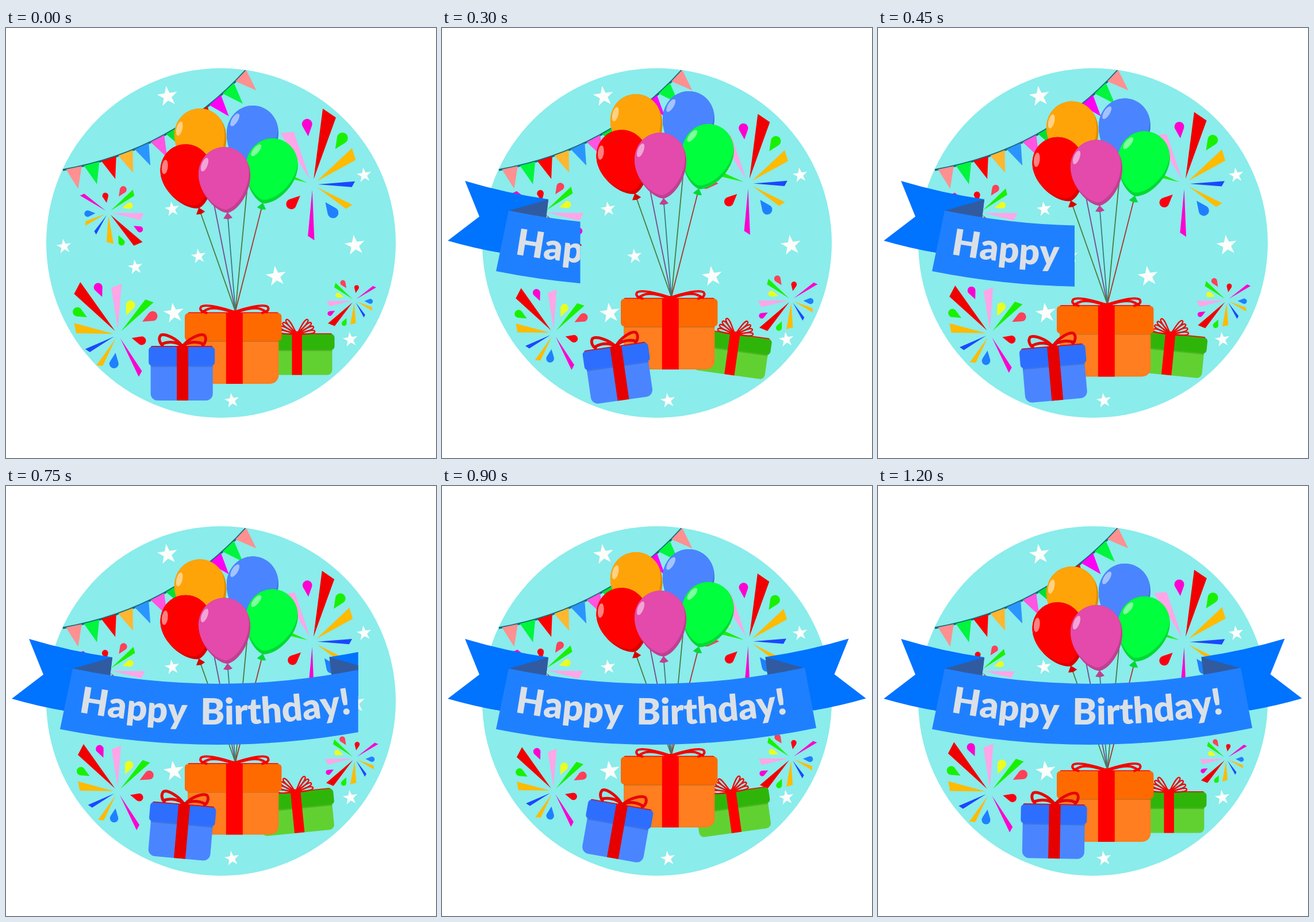
Animation of 748x748 px, one loop 1.35 s. Source, as an HTML page with a canvas:

```html
<!DOCTYPE html>
<html lang="en">
<head>
<meta charset="utf-8">
<title>Happy Birthday</title>
<style>
html, body { margin: 0; width: 100%; height: 100%; overflow: hidden; background: #fff; }
canvas { display: block; width: 748px; height: 748px; }
</style>
</head>
<body>
<canvas id="stage" width="748" height="748"></canvas>
<script>
const ctx = document.getElementById('stage').getContext('2d');
const STEP = 150, STEPS = 9;
const rad = deg => deg * Math.PI / 180;

// Straight moves between [step, value] keys
function track(n, ...keys) {
  for (let i = 1; i < keys.length; i++) {
    const [a, from] = keys[i - 1], [b, to] = keys[i];
    if (n <= b) return from + (to - from) * (n - a) / (b - a);
  }
  return keys[keys.length - 1][1];
}

const wave = n => (1 - Math.cos(n * Math.PI / 2)) / 2;
const lift = n => 25 * wave(n);
const sway = n => rad(8 * Math.sin(n * Math.PI / 4));
const rock = n => rad(track(n, [0, 0], [2.2, -9], [6, 10], [8, 1]));
const wipe = n => n && track(n, [1, 139], [3, 342], [6, 748]);

function poly(color, ...p) {
  ctx.fillStyle = color;
  ctx.beginPath();
  for (let i = 0; i < p.length; i += 2) ctx.lineTo(p[i], p[i + 1]);
  ctx.fill();
}

function ellipse(color, x, y, rx, ry = rx, turn = 0) {
  ctx.fillStyle = color;
  ctx.beginPath();
  ctx.ellipse(x, y, rx, ry, turn, 0, 7);
  ctx.fill();
}

function box(color, x, y, w, h, r = 0) {
  ctx.fillStyle = color;
  ctx.beginPath();
  ctx.roundRect(x, y, w, h, r);
  ctx.fill();
}

function stroke(color, width, d) {
  ctx.strokeStyle = color;
  ctx.lineWidth = width;
  ctx.stroke(new Path2D(d));
}

function fill(color, d) {
  ctx.fillStyle = color;
  ctx.fill(new Path2D(d));
}

function at(x, y, turn, draw) {
  ctx.save();
  ctx.translate(x, y);
  ctx.rotate(turn);
  draw();
  ctx.restore();
}

function mirrored(draw) {
  for (const side of [1, -1]) {
    ctx.save();
    ctx.scale(side, 1);
    draw();
    ctx.restore();
  }
}

const bigStars = [[281, 119], [470, 432], [292, 496], [607, 378]];
const smallStars = [[289, 315], [101, 380], [225, 416], [335, 397], [623, 256], [599, 542], [393, 648]];

function star(x, y, r) {
  const p = [];
  for (let i = 0; i < 10; i++) {
    const a = rad(i * 36 - 98), q = i % 2 ? r * .39 : r;
    p.push(x + q * Math.cos(a), y + q * Math.sin(a));
  }
  poly('#fdfdfb', ...p);
}

const flagColors = ['#ff9090', '#00f53d', '#ff0000', '#ffb730', '#2b95ff', '#ff55e0',
  '#00e030', '#2b95ff', '#ff0000', '#ff00f5', '#00f53d', '#ff9090'];

// Point on the bunting cord
const cord = t => [99 + 382 * t - 64 * t * t, 247 - 67 * t - 106 * t * t];

function bunting() {
  stroke('#176a7a', 3.5, 'M99 247Q290 213.5 417 74');
  flagColors.forEach((color, i) => {
    const t = .014 + i / 12;
    const [x, y] = cord(t), [u, v] = cord(t + .073);
    const k = 37 / Math.hypot(u - x, v - y);
    poly(color, x, y, u, v, (x + u) / 2 - (v - y) * k, (y + v) / 2 + (u - x) * k);
  });
}

// colour, angles of the two outer corners, length
const rays = [
  ['#f00000', 222.6, 234.2, 104], ['#ffa6e8', 261.6, 274, 82], ['#19f000', 308, 318, 77],
  ['#ff00d0', 57, 64, 76], ['#ffbb00', 116, 125, 61], ['#1a48ff', 148, 156, 58],
  ['#ffbb00', 181.5, 194.5, 73]
];

// colour, angle, distance, radius
const drops = [
  ['#ff00d0', 247, 89, 7.5], ['#eaff1f', 293, 55.5, 8], ['#ff4058', 332, 68, 8.5],
  ['#fb0010', 15, 42.5, 7.5], ['#1f80ff', 98, 51.5, 8], ['#19f000', 209, 81, 8]
];

function ray([color, from, to, len]) {
  const a = rad(from), b = rad(to), c = (a + b) / 2, far = len * 1.08;
  poly(color, 8 * Math.cos(c), 8 * Math.sin(c),
    len * Math.cos(a), len * Math.sin(a), far * Math.cos(b), far * Math.sin(b));
}

function drop([color, angle, dist, r]) {
  at(0, 0, rad(angle), () => {
    ctx.fillStyle = color;
    ctx.beginPath();
    ctx.arc(dist, 0, r, Math.PI + 1.1, Math.PI - 1.1);
    ctx.lineTo(dist - 2.4 * r, 0);
    ctx.fill();
  });
}

function burst(x, y, size, turn, flip, pulse) {
  at(x, y, rad(turn), () => {
    ctx.scale(flip * size, size);
    ctx.translate(-5, -14);
    ctx.scale(pulse, pulse);
    ctx.translate(5, 14);
    rays.forEach(ray);
    drops.forEach(drop);
  });
}

function fireworks(n) {
  const pulse = gain => 1 + gain * wave(n) - .006 * n;
  burst(533, 272, 1.185, -28, -1, pulse(-.07));
  burst(178, 321, .7, 95, -1, pulse(.13));
  burst(195, 533, 1, 0, 1, pulse(-.125));
  burst(606, 474, .54, -95, 1, pulse(.22));
}

// x, y, tilt, colour, string colour
const balloons = [
  [338, 188, -.2, '#ffa408', '#7a4a8c'],
  [429, 183, .1, '#4a85ff', '#4a7a40'],
  [314, 250, -.33, '#ff0000', '#4c7a3a'],
  [462.5, 240, .24, '#00ff3c', '#a8342c'],
  [380, 255, -.08, '#e34aab', '#3f7a80']
];
const skin = new Path2D('M0 67C-20 64-45 32-45 0C-45-27-25-48 0-48C25-48 45-27 45 0C45 32 20 64 0 67Z');
const shade = 'rgba(0,0,0,.15)';

function string([x, y, tilt, , color]) {
  ctx.strokeStyle = color;
  ctx.lineWidth = 1.8;
  ctx.beginPath();
  ctx.moveTo(x - 74 * Math.sin(tilt), y + 74 * Math.cos(tilt));
  ctx.lineTo(399, 493);
  ctx.stroke();
}

function balloon([x, y, tilt, color]) {
  at(x, y, tilt, () => {
    for (const tone of [color, shade]) {
      poly(tone, 0, 66, 8, 76, 0, 78, -8, 76);
      ctx.fillStyle = tone;
      ctx.fill(skin);
    }
    ctx.clip(skin);
    at(-2, -6, 0, () => {
      ctx.fillStyle = color;
      ctx.fill(skin);
    });
    ellipse('rgba(255,255,255,.5)', -33, -20, 5.2, 12.5, .45);
  });
}

// Origin at the middle of the lid's top edge
function gift(half, lidH, bodyH, band, lid, body, red, bow) {
  const inset = half * .06, r = bodyH * .2, mid = half * .025;
  const w = 2 * (half - inset);
  box(body, inset - half, lidH - 4, w, bodyH + 4, [0, 0, r, r]);
  box(shade, inset - half, lidH, w, 2);
  box(red, inset - half, -1.5, w, 6, 3);
  box(lid, -half, 0, 2 * half, lidH, 6);
  at(mid, 0, 0, () => {
    mirrored(bow);
    box(red, -band / 2, -1, band, lidH + bodyH + 1);
    ellipse(red, 0, -1.5, band * .35, 3.5);
  });
}

const wideBow = () => stroke('#f50000', 4,
  'M0-2C20-9 51-17 58-11C62-5 55-2 47 0M3-1C15-6 32-10 43-8C50-6 54-3 58-1');

const loopBow = () => stroke('#e60808', 5,
  'M1-1.5C10-14 31-24 38-20C43-14 39-4 33-1.5M1-1.5C8-7 21-11 36-5');

function fanBow() {
  for (let deg = 36; deg < 85; deg += 15) {
    at(0, 0, rad(deg), () => stroke('#ee0808', 2.3, 'M0 0C-1-12-5-27-1-31C3-33 5-27 0 0'));
  }
}

function tail() {
  fill('#0073ff', 'M40 266Q110 287 185 298L181 331L101 391Q55 383 10 370L65 328Z');
  poly('#315ba0', 115, 318, 185, 298, 181, 332);
}

// Sets a word along the curve of the ribbon, letter by letter
function word(text, x) {
  const bend = 3.6e-4, mid = 372;
  for (const ch of text) {
    const w = ctx.measureText(ch).width, c = x + w / 2 - mid;
    at(c + mid, 415 - bend * c * c, -2 * bend * c, () => ctx.fillText(ch, 0, 0));
    x += w;
  }
}

function banner(edge) {
  ctx.save();
  ctx.beginPath();
  ctx.rect(0, 0, edge, 748);
  ctx.clip();
  tail();
  ctx.save();
  ctx.translate(747.5, -.5);
  ctx.scale(-1, 1);
  tail();
  ctx.restore();
  fill('#1f80ff', 'M116 317.5Q373 371 631 316L651 421Q372 478 94 423Z');
  ctx.font = '900 63px Lato, "Open Sans", sans-serif';
  ctx.textAlign = 'center';
  ctx.fillStyle = '#dbe0e6';
  word('Happy', 126);
  word('Birthday!', 338);
  ctx.restore();
}

function paint(n) {
  ctx.fillStyle = '#fff';
  ctx.fillRect(0, 0, 748, 748);
  ellipse('#8aeceb', 374, 374, 304);
  bigStars.forEach(([x, y]) => star(x, y, 18.5));
  smallStars.forEach(([x, y]) => star(x, y, 13.5));
  bunting();
  fireworks(n);
  at(504.5, 558, sway(n), () => {
    ctx.translate(0, -25.5);
    gift(67, 27.5, 43.5, 17.5, '#2fb50a', '#61d132', '#ff0000', fanBow);
  });
  at(0, -lift(n), 0, () => {
    balloons.forEach(string);
    balloons.forEach(balloon);
    ctx.translate(395.2, 496);
    gift(84.2, 48, 75, 29, '#ff6a00', '#ff7e1f', '#ff0000', wideBow);
  });
  at(305.7, 589, rock(n), () => {
    ctx.translate(0, -34.5);
    gift(57.5, 33, 60.5, 20, '#2d6eff', '#4a85ff', '#e60000', loopBow);
  });
  banner(wipe(n));
}

const start = performance.now();
function tick() {
  paint(Math.floor((performance.now() - start) / STEP) % STEPS);
  requestAnimationFrame(tick);
}
tick();
</script>
</body>
</html>
```
